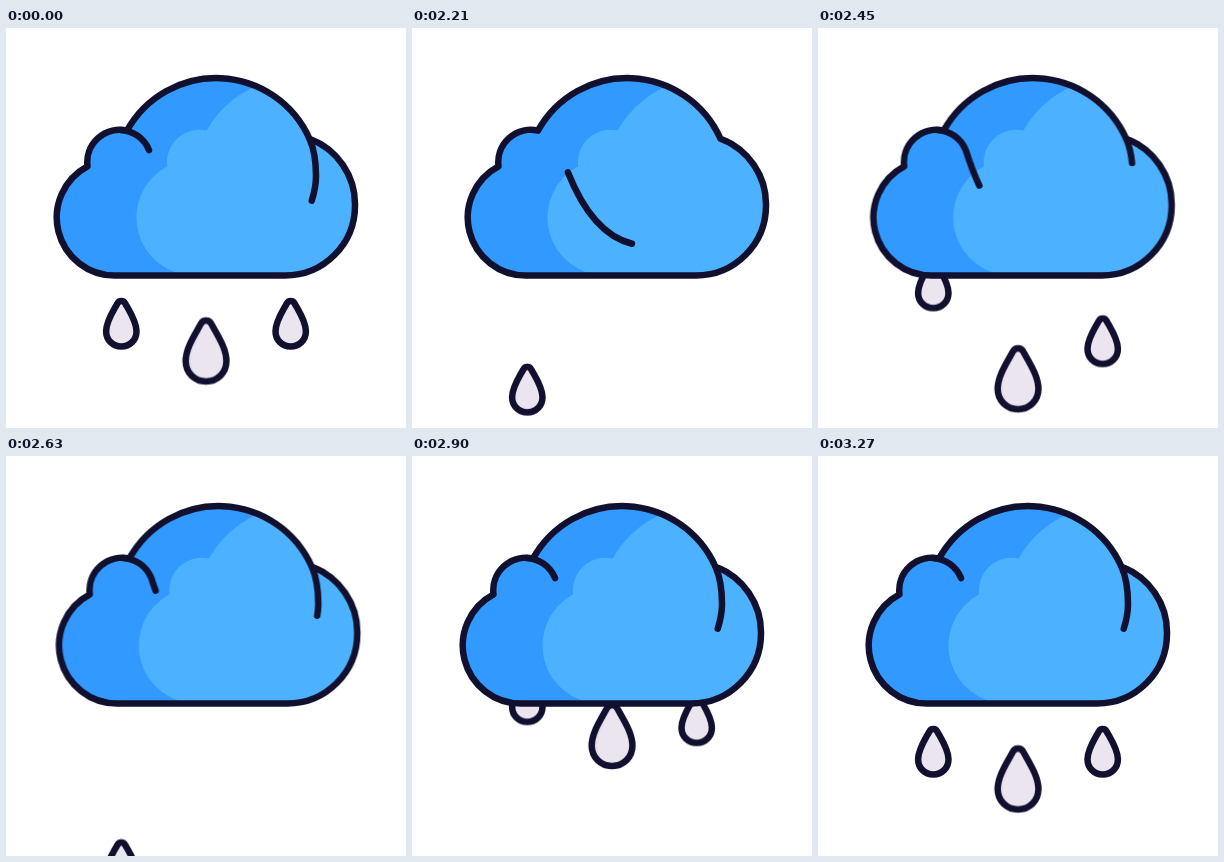
An HTML page for the animation above (3300 ms loop, 400 px wide and 400 px high).

```html
<!DOCTYPE html>
<html lang="en">
<head>
<meta charset="utf-8">
<title>Rain cloud</title>
<style>
  html, body { margin: 0; width: 100%; height: 100%; overflow: hidden; background: #fff; }
  svg { display: block; width: 100%; height: 100%; }

  .line {
    fill: none; stroke: #11112f; stroke-width: var(--weight, 6.5px);
    stroke-linecap: round; stroke-linejoin: round;
  }
  .dark { fill: #3199ff; }
  .light { fill: #4cb2ff; }
  .shade { fill: #e4ddea; }
  .water { fill: #ebe5f0; }

  .cloud, .curl, .left, .mid, .right { animation: 3300ms linear infinite; }
  .cloud { animation-name: sway; }
  .curl { animation-name: sweep; stroke-dasharray: 100 237; }
  .left { animation-name: fall-left; }
  .mid { animation-name: fall-mid; --weight: 4.85px; }
  .right { animation-name: fall-right; }

  @keyframes sway {
    0%, 61.5% { transform: translateX(0); }
    61.501% { transform: translateX(1px); animation-timing-function: cubic-bezier(.33, .4, .67, 1); }
    69.7% { transform: translateX(5.8px); animation-timing-function: cubic-bezier(.33, .1, .67, 1); }
    87.88%, 100% { transform: translateX(0); }
  }

  /* The curl runs backwards once round its path and wraps at the ends. */
  @keyframes sweep {
    0%, 61.5% { stroke-dashoffset: -273.5; }
    61.501% { stroke-dashoffset: -258; animation-timing-function: cubic-bezier(.33, .21, .67, .8); }
    66.97% { stroke-dashoffset: -61; animation-timing-function: cubic-bezier(.33, .65, .67, .8); }
    74.24% { stroke-dashoffset: 25; animation-timing-function: cubic-bezier(.33, .46, .67, .79); }
    79.7% { stroke-dashoffset: 50; animation-timing-function: cubic-bezier(.33, .62, .67, 1); }
    87.88%, 100% { stroke-dashoffset: 63.5; }
  }

  /* Each drop speeds up, falls once at full speed, then settles. */
  @keyframes fall-left {
    0%, 61.5% { transform: translateY(0); }
    61.501% { transform: translateY(1px); animation-timing-function: cubic-bezier(.33, .05, .67, .31); }
    69.39% { transform: translateY(135px); }
    69.4%, 72.78% { transform: translateY(-80px); }
    80.5% { transform: translateY(135px); }
    80.51% { transform: translateY(-80px); }
    85.4% { transform: translateY(-80px); animation-timing-function: cubic-bezier(.33, .67, .67, 1); }
    98.8%, 100% { transform: translateY(0); }
  }
  @keyframes fall-mid {
    0%, 61.5% { transform: translateY(0); }
    61.501% { transform: translateY(9px); animation-timing-function: cubic-bezier(.33, .145, .67, .48); }
    66.51% { transform: translateY(115px); }
    66.52%, 69.36% { transform: translateY(-110px); }
    77.38% { transform: translateY(115px); }
    77.39% { transform: translateY(-110px); }
    82.06% { transform: translateY(-110px); animation-timing-function: cubic-bezier(.33, .67, .67, 1); }
    97.88%, 100% { transform: translateY(0); }
  }
  @keyframes fall-right {
    0%, 61.5% { transform: translateY(0); }
    61.501% { transform: translateY(9px); animation-timing-function: cubic-bezier(.33, .137, .67, .46); }
    66.91% { transform: translateY(135px); }
    66.92%, 70.98% { transform: translateY(-75px); }
    78.46% { transform: translateY(135px); }
    78.47% { transform: translateY(-80px); }
    82.24% { transform: translateY(-80px); animation-timing-function: cubic-bezier(.33, .67, .67, 1); }
    97.58%, 100% { transform: translateY(0); }
  }
</style>
</head>
<body>
<svg viewBox="0 0 400 400">
  <defs>
    <path id="puff" d="M109 247.500H279A70 70 0 0 0 349 177.500A70 70 0 0 0 303.500 110.800A102 102 0 0 0 121 102.600A32.500 32.500 0 0 0 81.500 138.300A58 58 0 0 0 109 247.500Z"/>
    <path id="tear" d="M0 0C2 0 3.200 1 4 2.600C8 10 15.200 20.500 15.200 30.200C15.200 39 8.500 45.500 0 45.500C-8.500 45.500 -15.200 39 -15.200 30.200C-15.200 20.500 -8 10 -4 2.600C-3.200 1 -2 0 0 0Z"/>
    <clipPath id="in-puff"><use href="#puff"/></clipPath>
    <clipPath id="in-tear"><use href="#tear"/></clipPath>
    <g id="drop">
      <use href="#tear" class="shade"/>
      <g clip-path="url(#in-tear)"><use href="#tear" x="4" class="water"/></g>
      <use href="#tear" class="line"/>
    </g>
  </defs>

  <g class="left"><use href="#drop" transform="translate(115.300 273)"/></g>
  <g class="mid"><use href="#drop" transform="translate(200 292.500) scale(1.340)"/></g>
  <g class="right"><use href="#drop" transform="translate(284.700 273)"/></g>

  <g class="cloud">
    <use href="#puff" class="dark"/>
    <g clip-path="url(#in-puff)"><use href="#puff" x="79.700" class="light"/></g>
    <use href="#puff" class="line"/>
    <path class="line curl" pathLength="337" d="M115 101.900A32.500 32.500 0 0 1 143 122C152 150 172 206 216 216C258 225.500 288 212 300 187C306 175 310 160 310 148C310 134 308 121 303.500 110.800"/>
  </g>
</svg>
</body>
</html>
```
